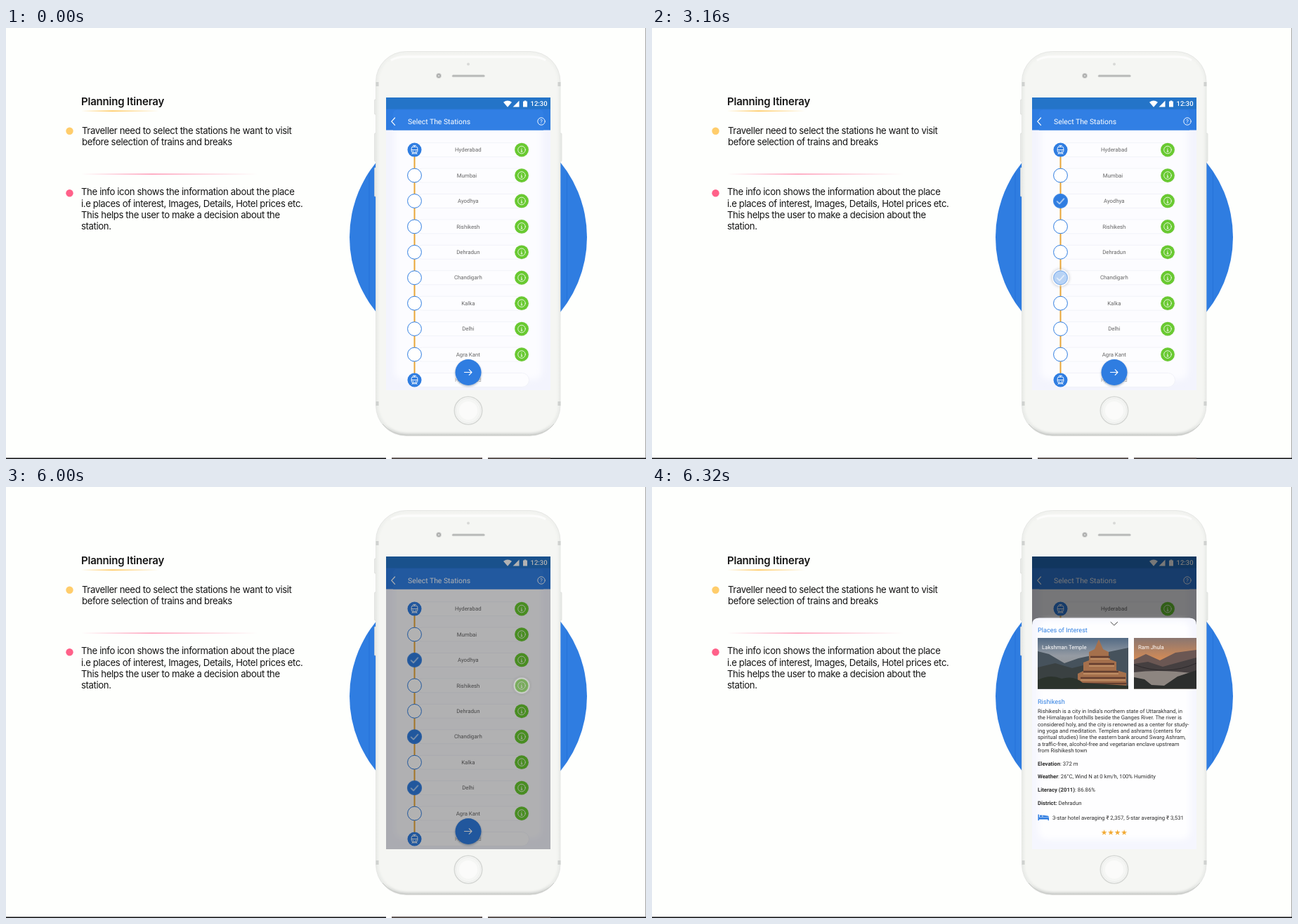
Write an HTML page that moves like this. It is 911 px wide and 614 px high and loops after 8000 ms.

```html
<!DOCTYPE html>
<html lang="en">
<head>
<meta charset="utf-8">
<title>Planning Itineray</title>
<style>
html, body { margin: 0; width: 100%; height: 100%; overflow: hidden; background: #fefffd; }
svg { display: block; width: 911px; height: 614px; }
text { font-family: Roboto, sans-serif; text-rendering: geometricPrecision; }
.note text { font: 400 13.2px Inter, sans-serif; letter-spacing: -.39px; fill: #151515; text-rendering: auto; }
.note .title { font-weight: 600; font-size: 15px; letter-spacing: -.2px; }
.station { font-size: 7.8px; fill: #666; text-anchor: middle; }
.body { font-size: 7.76px; fill: #2d2d2d; }
.body .b { font-weight: 700; }
.head { font-size: 9.1px; fill: #2f7fe2; }
.label { font-size: 7.8px; fill: #fff; }
.line { fill: none; stroke: #fff; stroke-linecap: round; stroke-linejoin: round; }

.anim, .check, .tap { animation: 8s linear infinite backwards; }
.tap { transform-box: fill-box; transform-origin: center; animation-name: tap; }
.info-tap { animation-name: infoTap; }
.dim { animation-name: dim; }
.panel { animation-name: rise; }
.strip { animation-name: strip; animation-timing-function: step-end; }

@keyframes tap {
  0% { opacity: 0; transform: scale(.75); }
  4% { opacity: 1; transform: scale(.97); }
  6.6% { opacity: 1; transform: none; }
  10%, 100% { opacity: 0; transform: none; }
}
@keyframes infoTap {
  0% { opacity: 0; transform: scale(.8); animation-timing-function: step-end; }
  65.5%, 68.5% { opacity: .3; transform: scale(.8); }
  72.5%, 74.2% { opacity: 1; transform: none; }
  75.8%, 100% { opacity: 0; transform: scale(.85); }
}
@keyframes check1 { 0%, 19.5% { opacity: 0; } 23.5%, 100% { opacity: 1; } }
@keyframes check2 { 0%, 37.5% { opacity: 0; } 42%, 100% { opacity: 1; } }
@keyframes check3 { 0%, 55% { opacity: 0; } 60%, 100% { opacity: 1; } }
@keyframes dim { 0%, 74% { opacity: 0; } 75% { opacity: .3; } 77%, 100% { opacity: .53; } }
@keyframes rise {
  0% { transform: translateY(397px); }
  75% { transform: translateY(397px); animation-timing-function: cubic-bezier(.2, .4, .1, 1); }
  79%, 100% { transform: none; }
}
@keyframes strip { 0% { opacity: 1; } 75.5%, 100% { opacity: 0; } }
</style>
</head>
<body>
<svg viewBox="0 0 911 614">
  <defs>
    <linearGradient id="yellow">
      <stop offset="0" stop-color="#ffc24d" stop-opacity="0"/><stop offset=".4" stop-color="#ffc24d"/>
      <stop offset="1" stop-color="#ffc24d" stop-opacity="0"/>
    </linearGradient>
    <linearGradient id="pink">
      <stop offset="0" stop-color="#ff6f98" stop-opacity="0"/><stop offset=".4" stop-color="#ff6f98" stop-opacity=".85"/>
      <stop offset="1" stop-color="#ff6f98" stop-opacity="0"/>
    </linearGradient>
    <linearGradient id="case" x2="0" y2="1">
      <stop offset="0" stop-color="#f1f2ef"/><stop offset=".1" stop-color="#eceeeb"/>
      <stop offset=".97" stop-color="#eaece9"/><stop offset="1" stop-color="#cfd1ce"/>
    </linearGradient>
    <linearGradient id="dusk" x2="0" y2="1">
      <stop offset="0" stop-color="#536a84"/><stop offset=".35" stop-color="#959ba3"/><stop offset="1" stop-color="#8b8179"/>
    </linearGradient>
    <linearGradient id="sunset" x2="0" y2="1">
      <stop offset="0" stop-color="#8a7670"/><stop offset=".4" stop-color="#cf8a58"/><stop offset="1" stop-color="#a8917f"/>
    </linearGradient>
    <filter id="soft" x="-20%" y="-20%" width="140%" height="140%"><feGaussianBlur stdDeviation="4"/></filter>
    <filter id="haze" x="-30%" y="-30%" width="160%" height="160%"><feGaussianBlur stdDeviation="1.4"/></filter>
    <clipPath id="screen"><path d="M541 99h234v417h-234z"/></clipPath>
    <clipPath id="pic1"><path d="M549 215h129v72.500h-129z"/></clipPath>
    <clipPath id="pic2"><path d="M686 215h89v72.500h-89z"/></clipPath>
    <g id="train">
      <circle r="10" fill="#2f7de1"/>
      <g class="line" stroke-width=".9">
        <rect x="-4.3" y="-4.3" width="8.6" height="8" rx="1.8"/>
        <path d="M-4.3 0h8.6M-2-6.2h4M0-6v1.500M-3.500 5.800l1.500-2M3.500 5.800l-1.500-2M-2.800 5.300h5.600M-2.300 2h.6M1.700 2h.6"/>
      </g>
    </g>
    <g id="info">
      <circle r="9.9" fill="#69c931"/>
      <circle class="line" r="5.3" stroke-width=".8"/>
      <path class="line" stroke-width=".9" d="M0-2.500v.1M-.6-.4h.6v2.800M-.9 2.500h1.800"/>
    </g>
    <g id="ring">
      <circle r="13" fill="none" stroke="#777" stroke-width="1.5" opacity=".55" filter="url(#haze)"/>
      <circle r="12.500" fill="#fff" fill-opacity=".55" stroke="#b9b9b9" stroke-width="1.2"/>
      <circle r="11" fill="none" stroke="#fff" stroke-width="1.8"/>
    </g>
  </defs>

  <rect width="911" height="614" fill="#fefffd"/>
  <rect x="910" width="1" height="614" fill="#a5a5a5"/>
  <rect y="612.4" width="911" height="1.6" fill="#17171a"/>
  <g class="anim strip">
    <path d="M541 611.500h234v2.500h-234z" fill="#fff"/>
    <path d="M549 612h129v2h-129zM686 612h89v2h-89z" fill="#5c5350"/>
  </g>

  <g class="note">
    <text class="title" x="107" y="110">Planning Itineray</text>
    <rect x="107" y="117.5" width="111" height="1.5" fill="url(#yellow)"/>
    <circle cx="90.5" cy="146.7" r="5.2" fill="#ffcd6b"/>
    <text x="108" y="151">Traveller need to select the stations he want to visit</text>
    <text x="108" y="167.3">before selection of trains and breaks</text>
    <rect x="107" y="207.5" width="251" height="1.3" fill="url(#pink)"/>
    <circle cx="90.5" cy="235.2" r="5.2" fill="#ff6189"/>
    <text x="107" y="238.3">The info icon shows the information about the place</text>
    <text x="107" y="254.7">i.e places of interest, Images, Details, Hotel prices etc.</text>
    <text x="107" y="271">This helps the user to make a decision about the</text>
    <text x="107" y="287.4">station.</text>
  </g>

  <circle cx="658" cy="298" r="169" fill="#2f7de1"/>
  <path d="M517 206v184M798.500 206v184" stroke="#1d68d2" opacity=".5"/>

  <g id="phone">
    <g fill="#eceeeb" stroke="#d2d4d2" stroke-width=".6">
      <rect x="524.5" y="102" width="4" height="21" rx="1"/>
      <rect x="524.5" y="150" width="4" height="40" rx="1"/>
      <rect x="524.5" y="199" width="4" height="41" rx="1"/>
      <rect x="787" y="150" width="4" height="40" rx="1"/>
    </g>
    <rect x="526.500" y="33.500" width="262.500" height="547.500" rx="43" fill="url(#case)" stroke="#e1e3e0" stroke-width=".8"/>
    <rect x="530" y="37" width="256" height="540" rx="40" fill="#f5f6f3" filter="url(#haze)"/>
    <path d="M526.500 77h4v6h-4zM785.500 77h4v6h-4zM526.500 532h4v6h-4zM785.500 532h4v6h-4z" fill="#cfd1cf"/>
    <path d="M536 564q12 15 34 16h176q22-1 34-16" fill="none" stroke="#c9cbc8" stroke-width="1"/>
    <path d="M548 46q8-5 22-5h176q14 0 22 5" fill="none" stroke="#fff" stroke-width="3" opacity=".7"/>
    <circle cx="658" cy="51.5" r="2" fill="#d8d9d7"/>
    <circle cx="616" cy="68" r="3.6" fill="#a9aaa9" stroke="#dedfdd"/>
    <circle cx="616" cy="68" r="1.5" fill="#d1d2d1"/>
    <rect x="635" y="66.8" width="46.5" height="3" rx="1.5" fill="#b5b6b5" stroke="#d9dad8" stroke-width=".6"/>
    <circle cx="658" cy="545" r="19.7" fill="#f9faf8" stroke="#d6d8d5" stroke-width="1.6"/>
    <circle cx="658" cy="545" r="17.5" fill="#f5f6f4" stroke="#ebecea"/>
    <circle cx="658" cy="545" r="13" fill="#fbfbfa"/>
  </g>

  <g clip-path="url(#screen)">
    <rect x="541" y="99" width="234" height="417" fill="#f3f4fd"/>
    <rect x="553" y="120" width="210" height="381" rx="12" fill="#fcfcff" filter="url(#soft)"/>
    <rect x="541" y="99" width="234" height="46.5" fill="#2d7be0"/>
    <path d="M551 145.500v-23q0-6 7-6h200q7 0 7 6v23z" fill="#317fe4"/>
    <rect x="541" y="99" width="234" height="16.5" fill="#2474c8"/>
    <path d="M708 105.700q6-4.600 12 0l-6 7zM721.500 112.500l9-9v9zM736 104.500h1.700v-1h2.600v1h1.700v8h-6z" fill="#fff"/>
    <text x="746.5" y="111.4" font-size="9.5" font-weight="500" fill="#fff">12:30</text>
    <path class="line" stroke-width="1.2" d="M553.500 128l-4.700 5.200 4.700 5.200"/>
    <text x="572" y="136.6" font-size="10.4" fill="#fff">Select The Stations</text>
    <circle class="line" cx="762" cy="133" r="5.2" stroke-width=".9"/>
    <text x="762" y="136" font-size="8" fill="#fff" text-anchor="middle">?</text>

    <path d="M581.500 180v318" stroke="#e9a637" stroke-width="2"/>
    <g id="rows"></g>
    <circle cx="658" cy="492" r="18.5" fill="#27476f" opacity=".4" filter="url(#haze)"/>
    <circle cx="658" cy="490.5" r="18.5" fill="#2f7de1"/>
    <path class="line" stroke-width="1.1" d="M652.500 490.500h10.500M659.200 486.700l3.800 3.800-3.800 3.800"/>

    <rect class="anim dim" x="541" y="99" width="234" height="417"/>
    <g id="taps"></g>

    <g class="anim panel">
      <path d="M541 516v-319.500q0-10 10-10h214q10 0 10 10v319.500z" fill="#f5f6fe"/>
      <rect x="550" y="191" width="216" height="311" rx="12" fill="#fefeff" filter="url(#soft)"/>
      <path class="line" stroke-width="1" style="stroke:#444" d="M653 192.500l4.800 4.500 4.800-4.500"/>
      <text class="head" x="549" y="207.4">Places of Interest</text>
      <g clip-path="url(#pic1)">
        <rect x="549" y="215" width="129" height="73" fill="url(#dusk)"/>
        <path d="M549 234l16 4 22 13 20-7 14-3 57-12v59h-129z" fill="#46525c"/>
        <path d="M549 257l25-6 24 7 20-5v35h-69z" fill="#3a4142"/>
        <path d="M606 288v-22l8-4v-12l8-3v-12l8-4 6-14 6 14 8 4v10l11 4v12l14 4v23z" fill="#a5704c"/>
        <path d="M614 263h50M622 252h36M624 242h28M610 272h64M608 280h68" stroke="#653f30" stroke-width="2.5"/>
        <path d="M614 266h50M622 255h36M624 245h28M610 275h64" stroke="#d7aa7c" stroke-width="1.2"/>
        <path d="M549 275q18-9 34-2 18-5 30 6l65 4v5h-129z" fill="#2b332c"/>
      </g>
      <g clip-path="url(#pic2)">
        <rect x="686" y="215" width="89" height="73" fill="url(#sunset)"/>
        <path d="M686 246l17-8 20 9 22-11 30-4v32h-89z" fill="#6b5753"/>
        <path d="M686 252l20-3 21 7 22-6 26-7v24h-89z" fill="#453f40"/>
        <path d="M686 264q38-5 89 2v22h-89z" fill="#8d8580"/>
        <path d="M686 253q46 17 89-2" fill="none" stroke="#2d292b"/>
        <path d="M686 271l15 3 10 8 18 1 19-13 27-9v27h-89z" fill="#2c2e2d"/>
      </g>
      <text class="label" x="555" y="231">Lakshman Temple</text>
      <text class="label" x="692" y="231">Ram Jhula</text>
      <text class="head" x="549" y="308.5">Rishikesh</text>
      <g class="body" id="about"></g>
      <path d="M549.500 466.500h1.500v4h14v4.500h-1.500v-1.500h-12.500v1.500h-1.500zM552 467.500h3.500v2.400h-3.500zM556.300 467.500l7 1q1.500.3 1.500 1.400h-8.500z" fill="#2f7de1"/>
      <g id="stars" fill="#f2aa35"></g>
    </g>
  </g>
</svg>
<script>
const put = (id, parts) => { document.getElementById(id).innerHTML = parts.join(''); };
const rowY = i => 173.6 + i * 36.43;
const stops = ['Hyderabad', 'Mumbai', 'Ayodhya', 'Rishikesh', 'Dehradun',
  'Chandigarh', 'Kalka', 'Delhi', 'Agra Kant', 'Hyderabad'];
const picks = [{ row: 2, at: 1.04 }, { row: 5, at: 2.48 }, { row: 7, at: 3.88 }];
const last = stops.length - 1;

function station(name, i) {
  const end = i === 0 || i === last;
  const pick = picks.findIndex(p => p.row === i);
  const dot = end ? '<use href="#train"/>'
    : '<circle r="9.9" fill="#fff" stroke="#2f7de1"/>';
  const check = pick < 0 ? '' : `<g class="check" style="animation-name:check${pick + 1}">
    <circle r="10.2" fill="#2f7de1"/>
    <path class="line" stroke-width="1.1" d="M-5 .4l3.5 3.4 6.5-7.2"/></g>`;
  const info = i === last ? '' : '<use href="#info" x="152.5"/>';
  return `<g transform="translate(581.5 ${rowY(i)})">
    <rect x="1" y="-10" width="162" height="20" rx="10" fill="#fdfdff" stroke="#eff0f6" stroke-width=".8"/>
    ${dot}${check}${info}
    <text class="station" x="${i === 1 ? 74.5 : 76.3}" y="2.7"${i === last ? ' opacity=".6"' : ''}>${name}</text></g>`;
}

const ring = (x, row, attrs) =>
  `<g transform="translate(${x} ${rowY(row)})"><g ${attrs}><use href="#ring"/></g></g>`;

put('rows', stops.map(station));
put('taps', [
  ...picks.map(p => ring(581.5, p.row, `class="tap" style="animation-delay:${p.at}s"`)),
  ring(734, 3, 'class="tap info-tap"')
]);

const story = [
  'Rishikesh is a city in India’s northern state of Uttarakhand, in',
  'the Himalayan foothills beside the Ganges River. The river is',
  'considered holy, and the city is renowned as a center for study-',
  'ing yoga and meditation. Temples and ashrams (centers for',
  'spiritual studies) line the eastern bank around Swarg Ashram,',
  'a traffic-free, alcohol-free and vegetarian enclave upstream',
  'from Rishikesh town'
];
const facts = [
  ['Elevation', ': 372 m'],
  ['Weather', ': 26°C, Wind N at 0 km/h, 100% Humidity'],
  ['Literacy (2011)', ': 86.86%'],
  ['District:', ' Dehradun']
];
const line = (x, y, text) => `<text x="${x}" y="${y}">${text}</text>`;
put('about', [
  ...story.map((s, i) => line(549, 321.7 + i * 9.4, s)),
  ...facts.map(([k, v], i) => line(549, 396.7 + i * 18.75, `<tspan class="b">${k}</tspan>${v}`)),
  line(570, 473.7, '3-star hotel averaging ₹ 2,357, 5-star averaging ₹ 3,531')
]);

const star = Array.from({ length: 10 }, (_, i) => {
  const r = i % 2 ? 1.7 : 4.3, a = i * Math.PI / 5;
  return `${(r * Math.sin(a)).toFixed(2)},${(-r * Math.cos(a)).toFixed(2)}`;
}).join(' ');
put('stars', [0, 1, 2, 3].map(i =>
  `<polygon points="${star}" transform="translate(${643.6 + i * 9.5} 492.3)"/>`));
</script>
</body>
</html>
```
